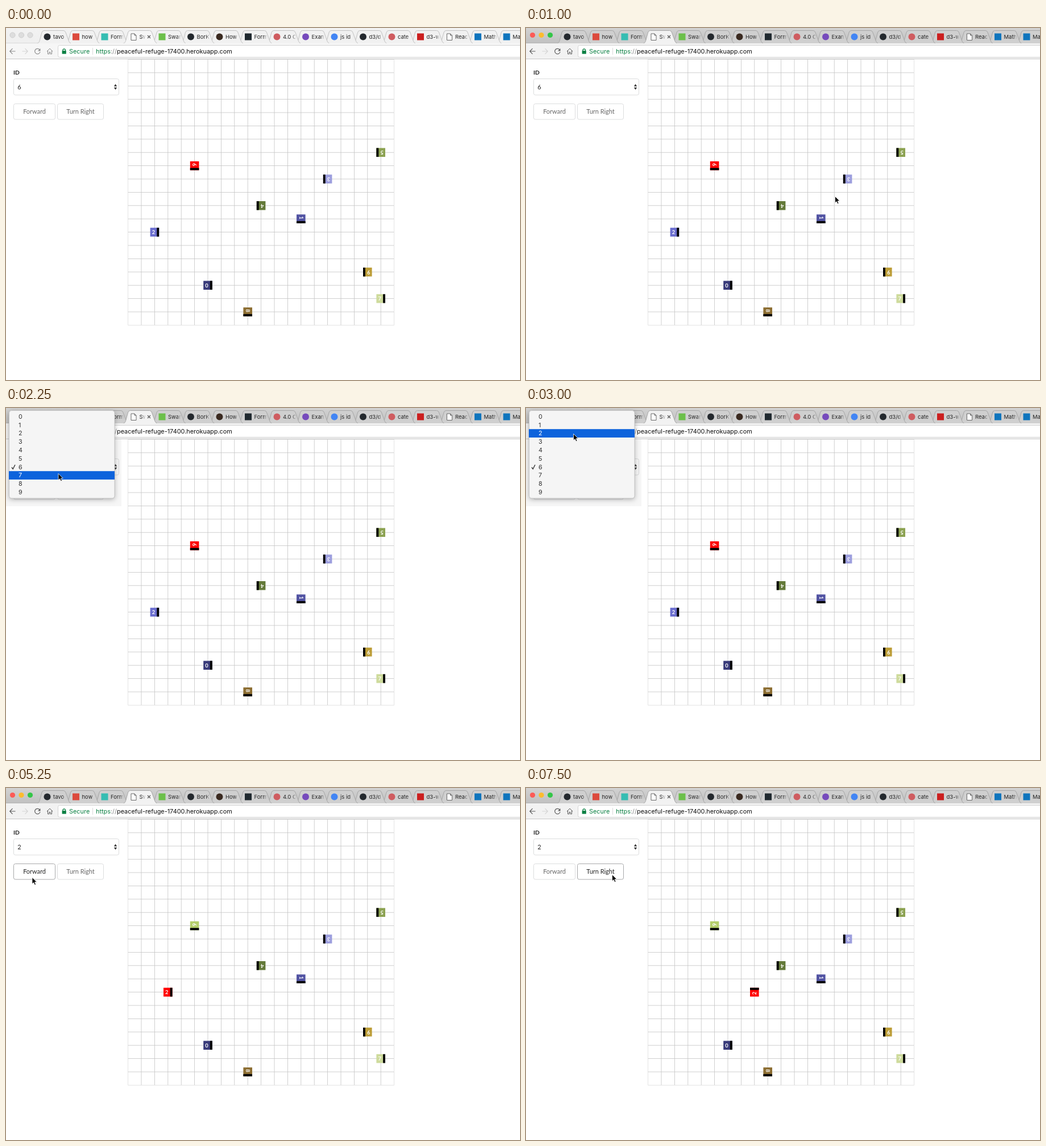
Recreate the animation shown at these times as an HTML page with a canvas. Size 904 by 620 pixels, loop 8 s.

```html
<!DOCTYPE html>
<html lang="en">
<head>
<meta charset="utf-8">
<title>Grid robots</title>
<style>
  html, body { margin: 0; width: 904px; height: 620px; overflow: hidden; background: #fff; }
  canvas { display: block; }
</style>
</head>
<body>
<canvas id="stage" width="904" height="620"></canvas>
<script>
const ctx = document.getElementById('stage').getContext('2d');
const LOOP = 8000, CELL = 23.4, LEFT = 214.6, TOP = 55.4;
const UI = 'Inter, sans-serif', PAGE = 'Lato, sans-serif';

// Tabs: title, icon colour, icon shape
const GITHUB = '#24292e', CUBE = '#cf5c60', BLUE = '#0f75bd';
const tabs = [
  ['tavo', GITHUB, 'circle'], ['how', '#dc4a3d', 'square'], ['Form', '#35bdb2', 'square'],
  ['Sw', '', 'page'], ['Swar', '#6cc04a', 'square'], ['BorK', GITHUB, 'circle'],
  ['How', '#3a2a20', 'circle'], ['Form', '#20292f', 'square'], ['4.0 C', CUBE, 'circle'],
  ['Exan', '#764abc', 'circle'], ['js id', '#4285f4', 'circle'], ['d3/d', GITHUB, 'circle'],
  ['cate', CUBE, 'circle'], ['d3-w', '#cb1f1f', 'square'], ['Reac', '', 'page'],
  ['Math', BLUE, 'square'], ['Mat', BLUE, 'square']
];
const ACTIVE_TAB = 3;

// Window colours with and without focus
const themes = {
  true: { strip: ['#d2d2d2', '#c0c0c0'], tab: '#cfcfcf', bar: '#f2f2f2', edge: '#a6a6a6',
    ink: '#5a5a5a', lights: ['#fc5b57', '#fdbc2e', '#34c648'], rim: null },
  false: { strip: ['#f2f2f2', '#efefef'], tab: '#f1f1f1', bar: '#f6f6f6', edge: '#c2c2c2',
    ink: '#8c8c8c', lights: ['#dddddd', '#dddddd', '#dddddd'], rim: '#cdcdcd' }
};

// Robots: column, row, quarter turns clockwise from facing right, colour
const robots = [
  [6, 17, 0, '#393b79'], [13, 12, 1, '#5254a3'], [2, 13, 0, '#6b6ecf'], [15, 9, 2, '#9c9ede'],
  [10, 11, 2, '#637939'], [19, 7, 2, '#8ca252'], [5, 8, 1, '#b5cf6b'], [19, 18, 0, '#cedb9c'],
  [9, 19, 1, '#8c6d31'], [18, 16, 2, '#bd9e39']
];

// Each step changes part of the state and holds until the next one
const steps = [
  [0, { cursor: null, focused: false, menu: null, id: 6, moved: 0, turns: 0, lit: '' }],
  [500, { cursor: [537, 262] }],
  [750, { cursor: [543, 296] }],
  [1000, { focused: true }],
  [1500, { cursor: [137, 125] }],
  [1750, { cursor: [99, 122] }],
  [2000, { cursor: [91.5, 115] }],
  [2250, { menu: 7 }],
  [2750, { menu: 2, cursor: [86, 52] }],
  [3000, { cursor: [83, 45] }],
  [3250, { cursor: [83.5, 48] }],
  [3750, { menu: null }],
  [4000, { id: 2 }],
  [4500, { cursor: [74, 92] }],
  [4750, { cursor: [55, 145] }],
  [5000, { cursor: [45.5, 157], lit: 'Forward' }],
  [5250, { moved: 1 }],
  [5500, { moved: 3 }],
  [5750, { moved: 4 }],
  [6000, { moved: 6 }],
  [6250, { cursor: [65, 154] }],
  [6500, { cursor: [151, 152], lit: 'Forward Turn Right' }],
  [6750, { turns: 1, lit: 'Turn Right' }],
  [7250, { turns: 2 }],
  [7500, { turns: 3 }]
];
const stateAt = t => Object.assign({}, ...steps.filter(s => s[0] <= t).map(s => s[1]));

function text(str, x, y, font, color, align = 'left') {
  ctx.font = font;
  ctx.fillStyle = color;
  ctx.textAlign = align;
  ctx.textBaseline = 'alphabetic';
  ctx.fillText(str, x, y);
}

function rect(x, y, w, h, color) {
  ctx.fillStyle = color;
  ctx.fillRect(x, y, w, h);
}

function circle(x, y, r, fill, stroke) {
  ctx.beginPath();
  ctx.arc(x, y, r, 0, Math.PI * 2);
  paint(fill, stroke);
}

function box(x, y, w, h, r, fill, stroke) {
  ctx.beginPath();
  ctx.roundRect(x, y, w, h, r);
  paint(fill, stroke);
}

function shape(d, fill, stroke, width) {
  const path = new Path2D(d);
  ctx.lineWidth = width || 1;
  if (fill) { ctx.fillStyle = fill; ctx.fill(path); }
  if (stroke) { ctx.strokeStyle = stroke; ctx.stroke(path); }
}

function paint(fill, stroke) {
  ctx.lineWidth = 1;
  if (fill) { ctx.fillStyle = fill; ctx.fill(); }
  if (stroke) { ctx.strokeStyle = stroke; ctx.stroke(); }
}

function drawAt(x, y, draw) {
  ctx.save();
  ctx.translate(x, y);
  draw();
  ctx.restore();
}

function fade(x0, y0, x1, y1, from, to) {
  const gradient = ctx.createLinearGradient(x0, y0, x1, y1);
  gradient.addColorStop(0, from);
  gradient.addColorStop(1, to);
  return gradient;
}

function drawTab(i, theme) {
  const [title, color, icon] = tabs[i], active = i === ACTIVE_TAB;
  drawAt(55 + 50.5 * i, 0, () => {
    shape('M0 27C4 26 4 22 5 19L8 8Q9 4.5 12 4.5H46Q49 4.5 50 8L54 19C55 22 56 26 59 27',
      active ? theme.bar : theme.tab, theme.edge);
    if (icon === 'circle') circle(17.5, 15.5, 6, color);
    if (icon === 'square') rect(11.5, 9.5, 12, 12, color);
    if (icon === 'page') shape('M13.5 10H19.5L22.5 13V21.5H13.5ZM19.5 10V13H22.5', '#fff', '#666');
    const end = active ? 39 : 51;
    text(title, 28, 19, '9.5px ' + UI, fade(end - 7, 0, end, 0, '#222', 'rgba(34,34,34,0)'));
    if (active) shape('M42.5 13L47.5 18M47.5 13L42.5 18', null, '#555', 1.2);
  });
}

function drawBrowser(theme) {
  rect(0, 0, 904, 27, fade(0, 0, 0, 27, ...theme.strip));
  theme.lights.forEach((c, i) => circle(11.5 + 15.5 * i, 12.5, 4.6, c, theme.rim));
  rect(0, 26.5, 904, 1, theme.edge);
  for (let i = tabs.length - 1; i >= 0; i--) if (i !== ACTIVE_TAB) drawTab(i, theme);
  drawTab(ACTIVE_TAB, theme);

  rect(0, 27, 904, 28, theme.bar);
  rect(0, 54, 904, 1, '#c8c8c8');
  const ink = theme.ink;
  shape('M16.5 41H7M11.5 36.2L6.8 41L11.5 45.8', null, ink, 1.2);
  shape('M28.5 41H38M33.5 36.2L38.2 41L33.5 45.8', null, '#d4d4d4', 1.2);
  shape('M59 38A4.7 4.7 0 1 0 60 42', null, ink, 1.2);
  shape('M60.5 36V40.5H56Z', ink);
  shape('M71.8 41.3L77 36.2L82.2 41.3M73.5 40V45.8H76V42.5H78V45.8H80.5V40', null, ink);

  box(91.5, 30.5, 830, 21, 3, '#fff', '#d2d2d2');
  shape('M100 41V39A2.2 2.2 0 0 1 104.4 39V41', null, '#0b8043', 1.3);
  rect(98.6, 40, 7.2, 5.6, '#0b8043');
  const font = '10.9px ' + UI;
  text('Secure', 111, 45, font, '#0b8043');
  rect(152, 35, 1, 12, '#d9d9d9');
  text('https', 158, 45, font, '#0b8043');
  const scheme = ctx.measureText('https').width;
  text('://', 158 + scheme, 45, font, '#888');
  const start = 158 + scheme + ctx.measureText('://').width;
  text('peaceful-refuge-17400.herokuapp.com', start, 45, font, '#111');
}

function drawButton(label, x, w, lit) {
  box(x + .5, 133.5, w, 27.5, 3, '#fff', lit ? '#a8a9aa' : '#dcddde');
  text(label, x + .5 + w / 2, 151.4, '10.95px ' + PAGE, lit ? '#222' : '#666', 'center');
}

function drawForm({ id, lit }) {
  text('ID', 13, 82, 'bold 10.3px ' + PAGE, '#222');
  box(13.5, 89.5, 185, 28.5, 3, '#fff', '#dcddde');
  text(id, 20.3, 108, '10.95px ' + PAGE, '#222');
  shape('M189.8 102.8L192.5 98.8L195.2 102.8ZM189.8 104.8L192.5 108.8L195.2 104.8Z', '#333');
  drawButton('Forward', 13, 73, lit.includes('Forward'));
  drawButton('Turn Right', 90, 81, lit.includes('Turn Right'));
}

function drawGrid() {
  const size = 20 * CELL, weight = .8;
  for (let i = 0; i <= 20; i++) {
    const color = i % 20 ? '#c4c4c4' : '#dedede', offset = i * CELL - weight / 2;
    rect(LEFT + offset, TOP, weight, size, color);
    rect(LEFT, TOP + offset, size, weight, color);
  }
}

function drawRobots({ id, moved, turns }) {
  robots.forEach(([col, row, facing, color], n) => {
    const driven = n === 2;
    const x = LEFT + CELL * (col + (driven ? moved : 0));
    drawAt(x, TOP + CELL * row, () => {
      ctx.rotate((facing + (driven ? turns : 0)) * Math.PI / 2);
      rect(-7.8, -7.8, 15.6, 15.6, n === id ? '#f00' : color);
      rect(3.9, -7.8, 3.9, 15.6, '#000');
      text(n, -2, 3.3, 'bold 9.4px ' + PAGE, '#fff', 'center');
    });
  });
}

function drawMenu(hovered) {
  rect(0, 55, 203, 118, 'rgba(0,0,0,.035)');
  ctx.save();
  ctx.beginPath();
  ctx.rect(0, 0, 203, 173);
  ctx.clip();
  ctx.shadowColor = 'rgba(0,0,0,.3)';
  ctx.shadowBlur = 8;
  ctx.shadowOffsetY = 2;
  box(5.5, 4.5, 185.5, 154.5, 4, '#f5f5f5');
  ctx.restore();
  box(5.5, 4.5, 185.5, 154.5, 4, null, '#c4c4c4');
  rect(5, 37.2 + 14.8 * (hovered - 2), 186, 14.8, '#0d63dc');
  for (let n = 0; n < 10; n++)
    text(n, 22, 18.8 + 14.8 * n, '10.8px ' + UI, n === hovered ? '#fff' : '#333');
  shape('M10 104.5L12.2 107.5L16 100', null, '#333', 1.4);
}

function drawCursor([x, y]) {
  drawAt(x, y, () => shape('M.5 .5V12L3.2 9.6L5 13.8L7 13L5.2 8.8H8.8Z', '#000', '#fff', .8));
}

function render() {
  const state = stateAt(performance.now() % LOOP);
  rect(0, 0, 904, 620, '#fff');
  drawGrid();
  drawRobots(state);
  drawBrowser(themes[state.focused]);
  drawForm(state);
  if (state.menu !== null) drawMenu(state.menu);
  if (state.cursor) drawCursor(state.cursor);
  requestAnimationFrame(render);
}
render();
</script>
</body>
</html>
```
